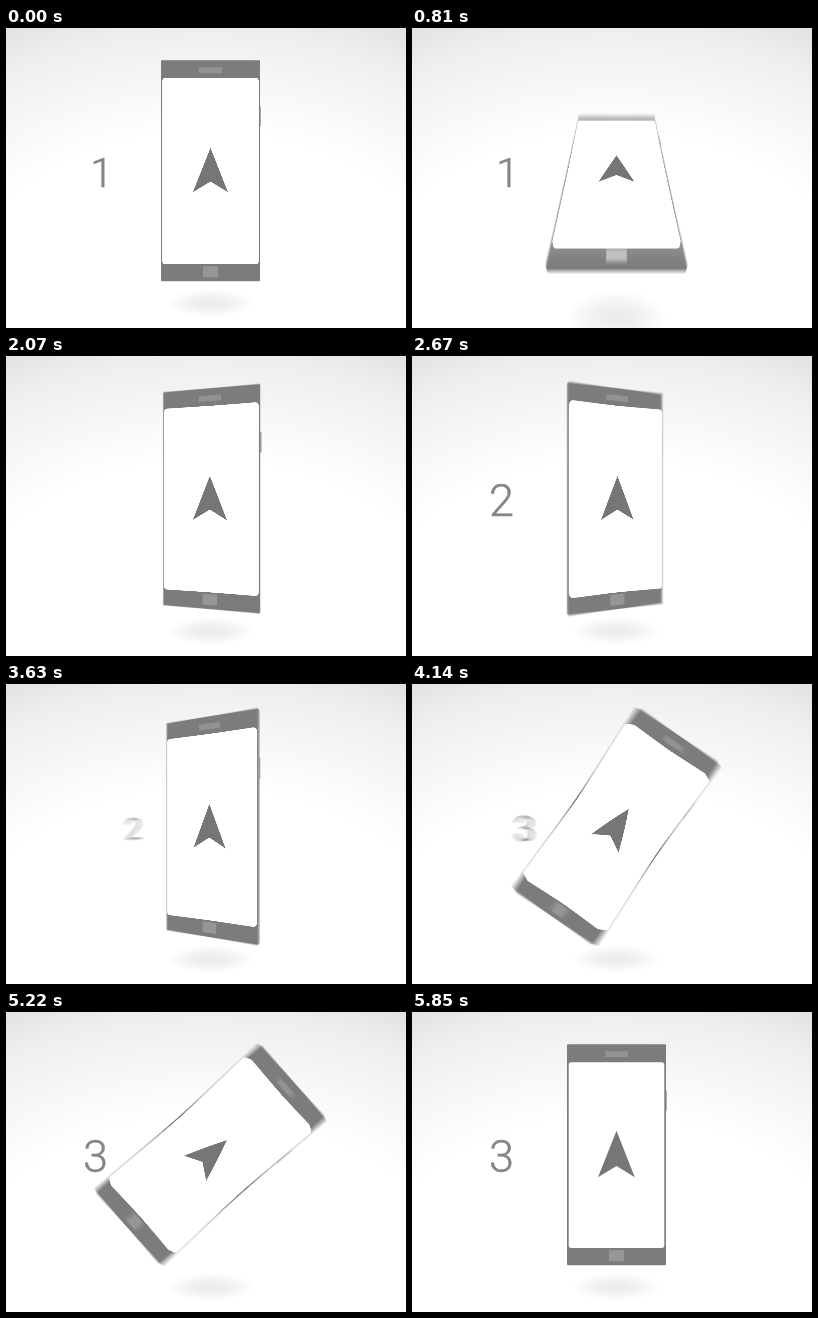
An HTML page with a canvas for the animation above (5.88 s loop, 400 px wide and 300 px high).

```html
<!DOCTYPE html>
<html lang="en">
<head>
<meta charset="utf-8">
<title>Phone rotation axes</title>
<style>
  html, body { margin: 0; width: 100%; height: 100%; overflow: hidden; background: #fff; }
  canvas { display: block; width: 400px; height: 300px; }
</style>
</head>
<body>
<canvas id="stage" width="400" height="300"></canvas>
<script>
const W = 400, H = 300;
const LOOP = 5880, PART = LOOP / 3, STEP = 30;
const SHUTTER = 20, SAMPLES = 10;
const CX = 204.5, CY = 142.7, CAMERA = 285;
const HALF_W = 49.5, HALF_H = 110.5, HALF_D = 3;

// Swing of each axis, in degrees: x, y, z
const SWING = [55, 55, 52];
const BEAT = PART / 4, TURN = 360;
const POSES = [0, 1, -1, 1, 0];

const DIGITS = [
  { text: "1", x: 95.5, base: 159, size: 41 },
  { text: "2", x: 89.5, base: 160, size: 45 },
  { text: "3", x: 89.5, base: 160, size: 45 }
];

const out = document.getElementById("stage").getContext("2d");
const layer = document.createElement("canvas");
layer.width = W;
layer.height = H;
const ctx = layer.getContext("2d");

const clamp = v => Math.min(1, Math.max(0, v));
const smooth = v => { v = clamp(v); return v * v * (3 - 2 * v); };
const mix = (a, b, k) => a + (b - a) * k;
const gray = v => { v = Math.round(v); return `rgb(${v},${v},${v})`; };

function swingAt(t) {
  const i = Math.min(3, Math.floor(t / BEAT));
  return mix(POSES[i], POSES[i + 1], smooth((t - i * BEAT) / TURN));
}

const angleAt = (part, t) => swingAt(t) * SWING[part] * Math.PI / 180;

function makeProjector(axis, angle) {
  const c = Math.cos(angle), s = Math.sin(angle);
  return ([x, y, z = HALF_D]) => {
    let p;
    if (axis === 0) p = [x, y * c + z * s, z * c - y * s];
    else if (axis === 1) p = [x * c - z * s, y, z * c + x * s];
    else p = [x * c - y * s, x * s + y * c, z];
    // The front face keeps its drawn size at rest
    const k = (CAMERA - HALF_D) / (CAMERA - p[2]);
    return [CX + p[0] * k, CY + p[1] * k];
  };
}

function tracePath(g, points, project) {
  points.map(project).forEach(([x, y], i) => i ? g.lineTo(x, y) : g.moveTo(x, y));
  g.closePath();
}

function fillShape(points, project, color) {
  ctx.beginPath();
  tracePath(ctx, points, project);
  ctx.fillStyle = color;
  ctx.fill();
}

const rect = (l, t, r, b) => [[l, t], [r, t], [r, b], [l, b]];

function roundRect(l, t, r, b, rad) {
  const corners = [
    [r - rad, t + rad, -90], [r - rad, b - rad, 0],
    [l + rad, b - rad, 90], [l + rad, t + rad, 180]
  ];
  return corners.flatMap(([x, y, from]) => [0, 30, 60, 90].map(step => {
    const a = (from + step) * Math.PI / 180;
    return [x + rad * Math.cos(a), y + rad * Math.sin(a)];
  }));
}

const BODY = roundRect(-HALF_W, -HALF_H, HALF_W, HALF_H, 1);
const SCREEN = roundRect(-47.8, -92.5, 47.8, 93.3, 2.5);
const ARROW = [[0, -24], [18.3, 22.5], [0, 11.3], [-18.5, 22.5]];

function facesViewer(points, project) {
  const [a, b, c] = points.map(project);
  return (b[0] - a[0]) * (c[1] - a[1]) - (b[1] - a[1]) * (c[0] - a[0]) > 0;
}

function drawBackground() {
  ctx.fillStyle = "#fff";
  ctx.fillRect(0, 0, W, H);
  ctx.save();
  ctx.translate(200, 300);
  ctx.scale(1 / 0.75, 1);
  const g = ctx.createRadialGradient(0, 0, 195, 0, 0, 340);
  g.addColorStop(0, "#fff");
  g.addColorStop(0.3, "#f8f8f8");
  g.addColorStop(0.72, "#eeeeee");
  g.addColorStop(1, "#e0e0e0");
  ctx.fillStyle = g;
  ctx.fillRect(-160, -300, 320, 300);
  ctx.restore();
}

function drawShadow(axis, angle) {
  const tilt = axis === 0 ? Math.sin(angle) : 0;
  const near = Math.max(0, -tilt), far = Math.max(0, tilt);
  ctx.save();
  ctx.translate(CX, 275 + near * 19);
  ctx.scale(44 + near * 8, 14 + near * 18);
  const g = ctx.createRadialGradient(0, 0, 0, 0, 0, 1);
  const alpha = 0.13 * clamp(1 - far * 1.25);
  g.addColorStop(0, `rgba(90,90,90,${alpha})`);
  g.addColorStop(0.5, `rgba(90,90,90,${alpha * 0.6})`);
  g.addColorStop(1, "rgba(90,90,90,0)");
  ctx.fillStyle = g;
  ctx.fillRect(-1, -1, 2, 2);
  ctx.restore();
}

function drawDigit(part, t) {
  const enter = part > 0 ? 1 - smooth(t / 310) : 0;
  const leave = part < 2 ? smooth((t - 1500) / 440) : 0;
  const p = Math.max(enter, leave);
  if (p > 0.97) return;
  const d = DIGITS[part];
  ctx.save();
  ctx.translate(mix(d.x, CX, p), mix(144.5, 146, p));
  ctx.scale(1 - p, 1 - p);
  ctx.globalAlpha = 1 - p;
  ctx.font = `300 ${d.size}px Roboto, "Open Sans", sans-serif`;
  ctx.textAlign = "center";
  ctx.fillStyle = ctx.strokeStyle = "#858585";
  ctx.lineWidth = 0.5;
  ctx.fillText(d.text, 0, d.base - 144.5);
  ctx.strokeText(d.text, 0, d.base - 144.5);
  ctx.restore();
}

// The end that leans away catches more light
function bodyTone(axis, angle, project) {
  const tilt = axis === 0 ? Math.sin(angle) : 0;
  const g = ctx.createLinearGradient(0, project([0, -HALF_H])[1], 0, project([0, HALF_H])[1]);
  g.addColorStop(0, gray(124 + 80 * Math.max(0, -tilt)));
  g.addColorStop(0.8, gray(124 + 42 * Math.abs(tilt)));
  g.addColorStop(1, gray(124 + 60 * Math.max(0, tilt)));
  return g;
}

function drawPhone(axis, angle) {
  const project = makeProjector(axis, angle);
  const w = HALF_W, h = HALF_H, f = HALF_D, b = -HALF_D;

  // Side keys
  fillShape([[w, -65, 0], [w + 1.2, -65, 0], [w + 1.2, -45, 0], [w, -45, 0]], project, "#8c8c8c");

  const sides = [
    [[[-w, -h, b], [w, -h, b], [w, -h, f], [-w, -h, f]], 152],
    [[[-w, h, f], [w, h, f], [w, h, b], [-w, h, b]], 122],
    [[[-w, -h, b], [-w, -h, f], [-w, h, f], [-w, h, b]], 160],
    [[[w, -h, f], [w, -h, b], [w, h, b], [w, h, f]], 160]
  ];
  for (const [points, tone] of sides) {
    if (facesViewer(points, project)) fillShape(points, project, gray(tone));
  }

  const light = axis === 0 ? Math.max(0, -Math.sin(angle)) : 0;
  fillShape(BODY, project, bodyTone(axis, angle, project));
  fillShape(rect(-11.5, -103.5, 11.5, -97.5), project, gray(146 + light * 60));
  fillShape(rect(-7.5, 95.5, 7.5, 106.5), project, gray(150 + light * 56));
  fillShape(SCREEN, project, "#fff");
  fillShape(ARROW, project, "#767676");
}

// The glowing screen stays pure white through the blur
function drawGlow(part, t) {
  const project = makeProjector(part, angleAt(part, t));
  out.beginPath();
  tracePath(out, SCREEN, project);
  tracePath(out, ARROW, project);
  out.fillStyle = "#fff";
  out.fill("evenodd");
}

function drawScene(part, t) {
  const angle = angleAt(part, t);
  drawBackground();
  drawShadow(part, angle);
  drawDigit(part, t);
  drawPhone(part, angle);
}

function render(time) {
  const now = Math.floor((time % LOOP) / STEP) * STEP;
  const part = Math.min(2, Math.floor(now / PART));
  const t = now - part * PART;
  // Average several moments for motion blur
  const moments = Array.from({ length: SAMPLES }, (_, i) =>
    Math.min(PART, Math.max(0, t + (i / (SAMPLES - 1) - 0.5) * SHUTTER)));
  moments.forEach((m, i) => {
    drawScene(part, m);
    out.globalAlpha = 1 / (i + 1);
    out.drawImage(layer, 0, 0);
  });
  out.globalAlpha = 1;
  if (angleAt(part, moments[0]) !== angleAt(part, moments[SAMPLES - 1])) {
    moments.forEach(m => drawGlow(part, m));
  }
}

const start = performance.now();
function tick() {
  render(performance.now() - start);
  requestAnimationFrame(tick);
}
tick();
</script>
</body>
</html>
```
